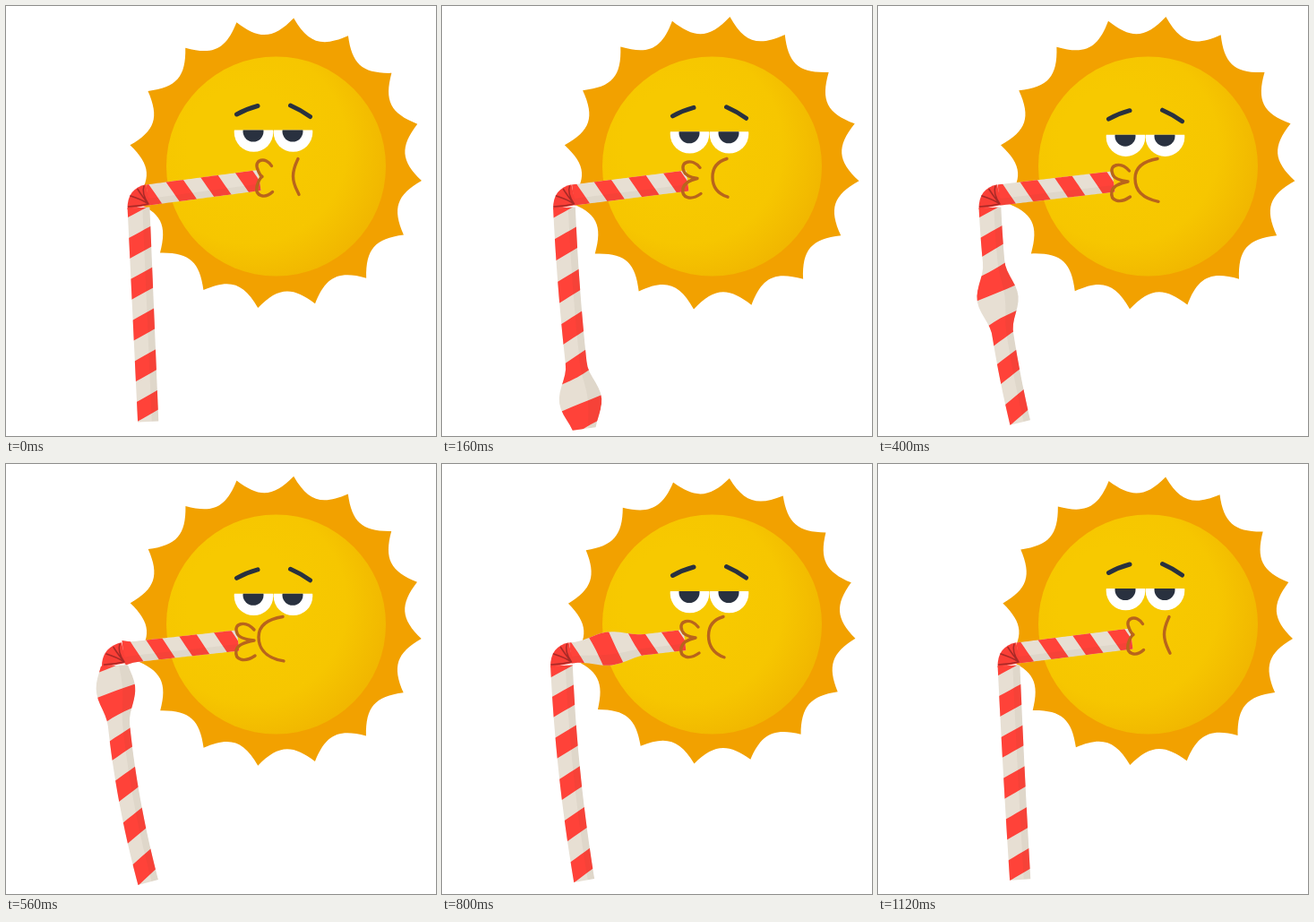
An HTML page with a canvas for the animation above (1.2 s loop, 480 by 480 pixels).

```html
<!DOCTYPE html>
<html lang="en">
<head>
<meta charset="utf-8">
<title>Sun sipping through a straw</title>
<style>
  html, body { margin: 0; width: 100%; height: 100%; overflow: hidden; background: #fff; }
  canvas { display: block; width: 480px; height: 480px; }
</style>
</head>
<body>
<canvas id="stage" width="480" height="480"></canvas>
<script>
const ctx = document.getElementById('stage').getContext('2d');
const STEP = 80, STEPS = 15;
const RED = '#ff4239', CREAM = '#e7dfd3', INK = '#29313f', LIP = '#b8641c';

// Poses at these steps; steps in between are interpolated.
const KEYS = [0, 2, 5, 7, 10, 12, 14, 15];
const POSE = {
  kneeX:  [148, 136.5, 125, 121, 133.5, 142.5, 146],
  bottom: [464, 472, 465, 467, 465, 464.5, 464],
  tipX:   [283, 274, 263, 259, 271, 282, 283],
  tipY:   [194.5, 195, 196, 197, 196.5, 197.5, 195],
  bulgeAt: [-60, 31, 139, 214, 284, 362, 440, 480],
  bulge:  [12, 12, 11, 9.5, 7, 5.5, 0, 0],
  faceY:  [0, 1.8, 5.2, 6.3, 3.5, 1.8, 0.5],
  lipX:   [280, 269, 261, 257, 267, 277, 279],
  lipY:   [190.5, 192.5, 196, 197, 194, 191.5, 190.5],
  notch:  [6, 16, 18, 20, 16, 8, 6],
  cheekX: [320.5, 302, 287, 282, 297.5, 311, 319.5],
  cheekEnd: [326, 318, 312, 309, 314, 317, 325]
};

function poseAt(step) {
  let k = 0;
  while (step >= KEYS[k + 1]) k++;
  const f = (step - KEYS[k]) / (KEYS[k + 1] - KEYS[k]);
  const pose = {};
  for (const name in POSE) {
    const v = POSE[name], next = k + 1 < v.length ? v[k + 1] : v[0];
    pose[name] = v[k] + (next - v[k]) * f;
  }
  return pose;
}

function fill(color) { ctx.fillStyle = color; ctx.fill(); }

function line(color, width, draw) {
  ctx.beginPath();
  draw();
  ctx.strokeStyle = color;
  ctx.lineWidth = width;
  ctx.lineCap = ctx.lineJoin = 'round';
  ctx.stroke();
}

function polygon(points, color) {
  ctx.beginPath();
  points.forEach(p => ctx.lineTo(p[0], p[1]));
  ctx.closePath();
  if (color) fill(color);
}

function drawSun(step) {
  const grow = 2.3 * Math.sin(2 * Math.PI * (step + 0.4) / STEPS) - 0.4;
  const at = (r, deg) => {
    const a = deg * Math.PI / 180;
    return [301.2 + (r + 0.5) * Math.sin(a), 175.2 - (r - 0.5) * Math.cos(a)];
  };
  const tip = 163.5 + grow, valley = 139 + grow * 0.4, gap = 22.5;
  ctx.beginPath();
  ctx.moveTo(...at(tip, 7));
  for (let i = 0; i < 16; i++) {
    const a = 7 + i * gap;
    ctx.bezierCurveTo(...at(valley, a + 8), ...at(valley, a + gap - 8), ...at(tip, a + gap));
  }
  fill('#f2a100');

  const shade = ctx.createRadialGradient(262, 152, 60, 278, 160, 150);
  shade.addColorStop(0, '#f7c900');
  shade.addColorStop(0.55, '#f6c600');
  shade.addColorStop(1, '#f1b700');
  ctx.beginPath();
  ctx.arc(301.5, 179, 122.5, 0, 7);
  fill(shade);
}

function drawFace(p) {
  const lid = 138.5 + p.faceY;
  for (const x of [276.5, 320.5]) {
    ctx.save();
    ctx.beginPath();
    ctx.rect(x - 24, lid, 48, 40);
    ctx.clip();
    ctx.beginPath();
    ctx.arc(x, lid + 2.5, 21.8, 0, 7);
    fill('#fff');
    ctx.beginPath();
    ctx.arc(x - 0.5, lid + 1.5, 11.5, 0, 7);
    fill(INK);
    ctx.restore();
  }
  line(INK, 5, () => {
    ctx.moveTo(257.5, 121 + p.faceY);
    ctx.quadraticCurveTo(268, 115 + p.faceY, 281, 111.5 + p.faceY);
    ctx.moveTo(317.5, 111 + p.faceY);
    ctx.quadraticCurveTo(329, 116 + p.faceY, 339.5, 123.5 + p.faceY);
  });
}

function drawMouth(p) {
  const { lipX: x, lipY: y, notch, cheekX, cheekEnd } = p;
  const wide = notch * 0.25;
  line(LIP, 3.4, () => {
    ctx.moveTo(x + 15 + wide, y - 12);
    ctx.bezierCurveTo(x + 10, y - 23, x - 4, y - 19, x + 1, y - 8);
    ctx.quadraticCurveTo(x + 3, y - 2, x + notch, y);
    ctx.quadraticCurveTo(x + 2, y + 3, x, y + 11);
    ctx.bezierCurveTo(x - 2, y + 22, x + 9, y + 25, x + 16 + wide, y + 17);
  });
  const low = 210.5 + p.faceY * 1.5, mid = 190 + p.faceY * 0.5;
  line(LIP, 3.4, () => {
    ctx.moveTo(cheekEnd, 170.5);
    ctx.bezierCurveTo(cheekX + 4, 174, cheekX, mid - 9, cheekX, mid);
    ctx.bezierCurveTo(cheekX, mid + 10, cheekX + 5, low - 4, cheekEnd + 1, low);
  });
}

// A striped tube along a quadratic curve; s runs along it, side from -1 to 1 across it.
function drawTube(from, ctrl, to, length, half, slant, red, period, warp) {
  const point = (s, side) => {
    const t = s / length, u = 1 - t;
    const pos = i => u * u * from[i] + 2 * u * t * ctrl[i] + t * t * to[i];
    const dir = i => u * (ctrl[i] - from[i]) + t * (to[i] - ctrl[i]);
    const dx = dir(0), dy = dir(1), w = half(s) * side / Math.hypot(dx, dy);
    return [pos(0) - dy * w, pos(1) + dx * w];
  };
  const edge = (side, a, b) =>
    Array.from({ length: 41 }, (_, i) => point(a + (b - a) * i / 40, side));
  const band = (a, b) => edge(a, 0, length).concat(edge(b, length, 0));

  ctx.save();
  polygon(band(-1, 1), CREAM);
  ctx.clip();
  for (let c = red - period; c < length + period; c += period) {
    const across = (s, dir) => [-1.1, -0.5, 0, 0.5, 1.1].map(k =>
      point(warp(s) + k * dir * slant, k * dir));
    polygon(across(c - period / 4, 1).concat(across(c + period / 4, -1)), RED);
  }
  polygon(band(0.35, 1.02), 'rgba(90,60,40,.05)');
  ctx.restore();
}

function drawStraw(p) {
  const x = p.kneeX, long = 240;
  const swell = d => Math.abs(d) < 40 ? p.bulge * (1 + Math.cos(Math.PI * d / 40)) / 2 : 0;
  const stretch = b => s => {
    const d = s - b;
    return s + 0.025 * p.bulge * d * Math.exp(-d * d / 1600);
  };

  const foot = [158.7, p.bottom], knee = [x, 225];
  const bow = [(foot[0] + x) / 2 - (148 - x) * 0.5, (p.bottom + 225) / 2];
  drawTube(foot, bow, knee, long,
    s => 11.6 + s / long * 0.8 + swell(s - p.bulgeAt), 6, 17, 46, stretch(p.bulgeAt));

  const start = [x + 10, 211], end = [p.tipX, p.tipY];
  const reach = Math.hypot(end[0] - start[0], end[1] - start[1]);
  const at = p.bulgeAt - long;
  const middle = [(start[0] + end[0]) / 2, (start[1] + end[1]) / 2];
  drawTube(start, middle, end, reach,
    s => 11.6 + swell(s - at), 6, (reach - 10) % 39, 39, stretch(at));

  // Folded joint
  const puff = swell(long - p.bulgeAt) * 0.6;
  ctx.beginPath();
  ctx.moveTo(x - 12.4 - puff, 227);
  ctx.bezierCurveTo(x - 13 - puff, 211, x - 5, 202, x + 8, 199.3);
  ctx.lineTo(x + 13, 222);
  ctx.closePath();
  fill('#fa3f37');
  line('#a92a27', 1.5, () => {
    for (const [dx, y] of [[-11.5, 224], [-9, 212], [-1, 204.5], [6, 201]]) {
      ctx.moveTo(x + 11, 221);
      ctx.quadraticCurveTo(x + 3, y * 0.6 + 221 * 0.4, x + dx, y);
    }
  });
}

function frame(now) {
  const step = Math.floor(now / STEP) % STEPS;
  const pose = poseAt(step);
  ctx.fillStyle = '#fff';
  ctx.fillRect(0, 0, 480, 480);
  drawSun(step);
  drawFace(pose);
  drawStraw(pose);
  drawMouth(pose);
}

let begin;
function tick(now) {
  begin ??= now;
  frame(now - begin);
  requestAnimationFrame(tick);
}
frame(0);
requestAnimationFrame(tick);
</script>
</body>
</html>
```
